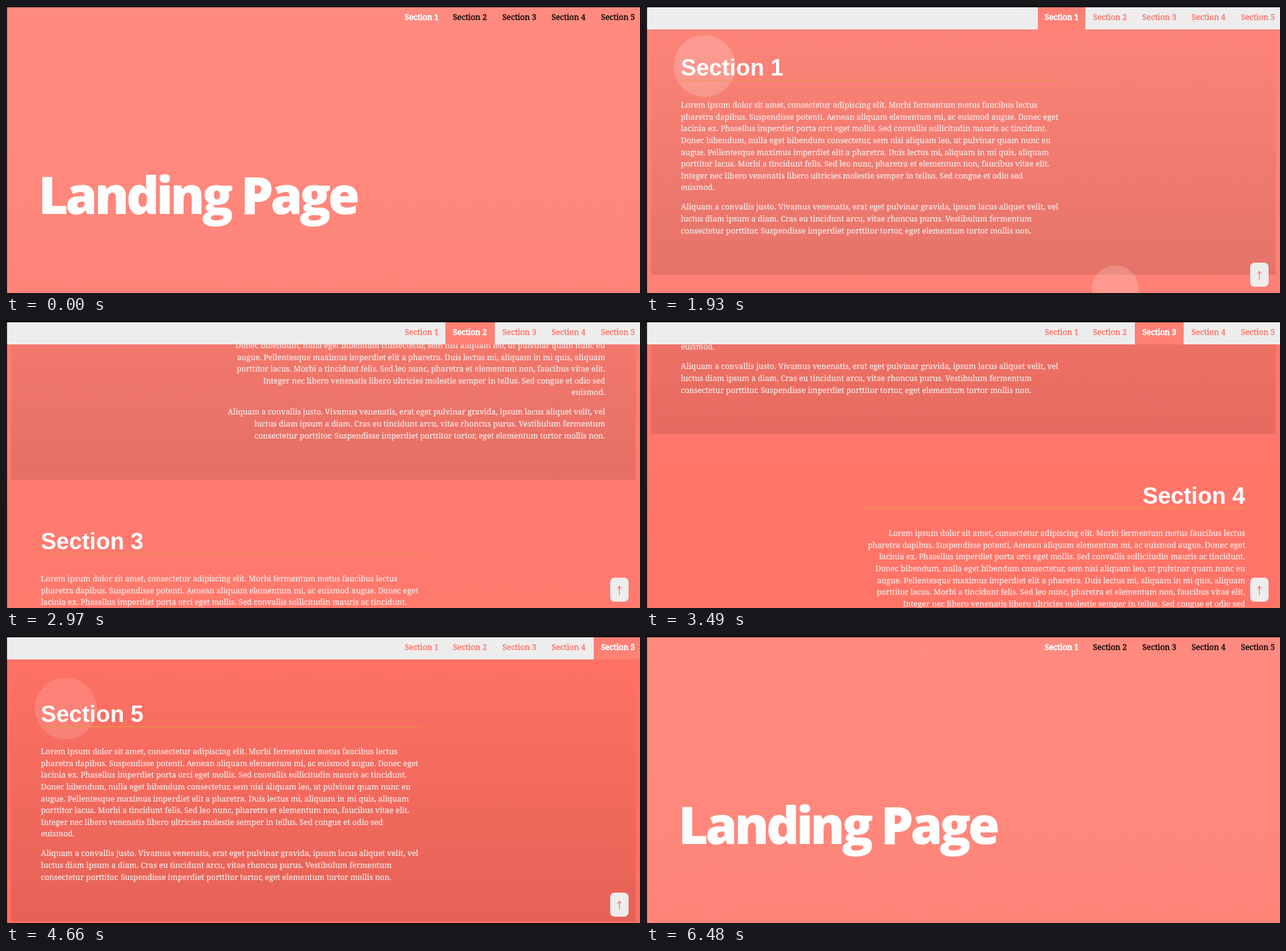
Animation, 1000 px wide and 454 px high, one loop 8 s. Source, as an HTML page with a canvas:

```html
<!DOCTYPE html>
<html lang="en">
<head>
<meta charset="utf-8">
<title>Landing Page</title>
<style>
  html, body { margin: 0; width: 100%; height: 100%; overflow: hidden; background: #ff897e; }
  canvas { display: block; width: 1000px; height: 454px; }
</style>
</head>
<body>
<canvas id="stage" width="1000" height="454"></canvas>
<script>
const ctx = document.getElementById('stage').getContext('2d');
const W = 1000, H = 454, LOOP = 8000, STEP = 130;
const HERO = 454, SECTION = 425, COUNT = 5;
const PAGE = HERO + SECTION * COUNT + 3;
const END = HERO + 1674;
const SERIF = '"Noto Serif", serif';
const PALE = '#eeeded', CORAL = '#ff8075';
const LINKS = [629, 705, 783, 860.5, 938.5];
const TABS = [618, 693, 771, 848, 927, 1000];

const PARAGRAPHS = [
  ['Lorem ipsum dolor sit amet, consectetur adipiscing elit. Morbi fermentum metus faucibus lectus',
   'pharetra dapibus. Suspendisse potenti. Aenean aliquam elementum mi, ac euismod augue. Donec eget',
   'lacinia ex. Phasellus imperdiet porta orci eget mollis. Sed convallis sollicitudin mauris ac tincidunt.',
   'Donec bibendum, nulla eget bibendum consectetur, sem nisi aliquam leo, ut pulvinar quam nunc eu',
   'augue. Pellentesque maximus imperdiet elit a pharetra. Duis lectus mi, aliquam in mi quis, aliquam',
   'porttitor lacus. Morbi a tincidunt felis. Sed leo nunc, pharetra et elementum non, faucibus vitae elit.',
   'Integer nec libero venenatis libero ultricies molestie semper in tellus. Sed congue et odio sed',
   'euismod.'],
  ['Aliquam a convallis justo. Vivamus venenatis, erat eget pulvinar gravida, ipsum lacus aliquet velit, vel',
   'luctus diam ipsum a diam. Cras eu tincidunt arcu, vitae rhoncus purus. Vestibulum fermentum',
   'consectetur porttitor. Suspendisse imperdiet porttitor tortor, eget elementum tortor mollis non.']
];

// Scroll path: time, position, speed in px per ms
const SCROLL = [
  [440, 0, 0], [980, HERO, 0], [1960, HERO, 0], [2970, HERO + 599, 0.8],
  [4010, HERO + 1579, 0.75], [4300, END, 0], [5830, END, 0], [6480, 0, 0]
];

function scrollAt(t) {
  if (t <= SCROLL[0][0]) return 0;
  for (let i = 1; i < SCROLL.length; i++) {
    const [t0, p0, v0] = SCROLL[i - 1], [t1, p1, v1] = SCROLL[i];
    if (t > t1) continue;
    const d = t1 - t0, u = (t - t0) / d, w = 1 - u;
    return w * w * (1 + 2 * u) * p0 + u * w * w * d * v0
         + u * u * (3 - 2 * u) * p1 - u * u * w * d * v1;
  }
  return 0;
}

// The picture advances in even steps, with three rests
function stepTime(t) {
  if (t < 500) return 0;
  if (t >= 6480) return 6480;
  if (t >= 4790 && t < 5830) return 4790;
  const start = t < 5830 ? 500 : 5830;
  return start + Math.floor((t - start) / STEP) * STEP;
}

// "bolder" thickens the strokes by that many pixels
function text(str, x, y, font, color, { align = 'left', bolder = 0, spacing = 0 } = {}) {
  ctx.font = font;
  ctx.letterSpacing = spacing + 'px';
  ctx.fillStyle = ctx.strokeStyle = color;
  ctx.textAlign = align;
  ctx.fillText(str, x, y);
  if (bolder) {
    ctx.lineWidth = bolder;
    ctx.lineJoin = 'round';
    ctx.strokeText(str, x, y);
  }
}

function rect(x, y, w, h, fill) {
  ctx.fillStyle = fill;
  ctx.fillRect(x, y, w, h);
}

function fade(y0, y1, from, to) {
  const g = ctx.createLinearGradient(0, y0, 0, y1);
  g.addColorStop(0, from);
  g.addColorStop(1, to);
  return g;
}

function orb(x, y, r, ms, period, alpha) {
  const a = Math.PI + ms / period * Math.PI * 2;
  ctx.fillStyle = `rgba(255,255,255,${0.187 * alpha})`;
  ctx.beginPath();
  ctx.arc(x + 11.7 * Math.cos(a), y + 11.7 * Math.sin(a), r, 0, Math.PI * 2);
  ctx.fill();
}

function orbs(index, top, t) {
  if (index === 0 && t < 4300) {
    const ms = Math.min(t, 1930) - 1930;
    orb(104, top + 95, 48.7, ms, 4000, 1);
    orb(752, top + 447.5, 37, ms, -5000, 1);
  } else if (index === 4 && t > 4300) {
    const ms = t < 5830 ? t - 4300 : 0;
    orb(104, top + 95, 48.7, ms, 4000, t < 5830 ? Math.min(1, ms / 500) : 1);
  }
}

function section(index, top) {
  const right = index % 2 === 1;
  const left = right ? 345 : 55;
  const x = right ? 945 : 55;
  const align = right ? 'right' : 'left';
  text('Section ' + (index + 1), x, top + 109.5,
    'bold 36.4px "Liberation Sans", Arial, sans-serif', '#fff', { align });
  rect(left, top + 117, 600, 1, '#e2a03a');
  PARAGRAPHS.forEach((lines, p) => lines.forEach((line, i) =>
    text(line, x, top + 161 + p * 161.3 + i * 18.64, '12.28px ' + SERIF, '#f8ebe8',
      { align, bolder: 0.2 })));
}

function nav(active, scrolled) {
  if (scrolled) {
    rect(0, 0, W, 37, PALE);
    rect(TABS[active], 2, TABS[active + 1] - TABS[active], 35, CORAL);
  }
  LINKS.forEach((x, i) => {
    const on = i === active;
    const color = on ? '#fff' : scrolled ? '#fa786d' : '#140a09';
    text('Section ' + (i + 1), x, 22, '500 12.5px ' + SERIF, color, { bolder: on ? 0.8 : 0.45 });
  });
}

function topButton() {
  ctx.fillStyle = PALE;
  ctx.beginPath();
  ctx.roundRect(953, 406, 29, 38, 7);
  ctx.fill();
  ctx.strokeStyle = '#f4685c';
  ctx.lineWidth = 1.1;
  ctx.beginPath();
  ctx.moveTo(967.5, 433);
  ctx.lineTo(967.5, 419.5);
  ctx.moveTo(964.5, 423.5);
  ctx.lineTo(967.5, 419.5);
  ctx.lineTo(970.5, 423.5);
  ctx.stroke();
}

function draw(now) {
  const t = stepTime(now % LOOP);
  const y = Math.round(scrollAt(t));
  const topOf = i => HERO + i * SECTION - y;
  let active = 0;
  for (let i = 1; i < COUNT; i++) if (topOf(i) < 100) active = i;

  rect(0, 0, W, H, fade(-y, PAGE - y, '#ff8a7f', '#ff6d60'));
  text('Landing Page', 51, 329 - y, '800 81px "Open Sans", sans-serif', '#fff', { spacing: -4.4 });

  const top = topOf(active);
  rect(8, top, 985, SECTION, fade(top, top + SECTION, 'rgba(0,0,0,0)', 'rgba(0,0,0,.1)'));
  orbs(active, top, t);
  for (let i = 0; i < COUNT; i++) {
    const sy = topOf(i);
    if (sy < H && sy + SECTION > 0) section(i, sy);
  }

  const scrolled = y > 60;
  nav(active, scrolled);
  if (scrolled) topButton();
  rect(0, 0, W, 2, '#000');
  rect(0, 0, 1.5, H, '#000');
}

const began = performance.now();
function tick() {
  draw(performance.now() - began);
  requestAnimationFrame(tick);
}
tick();
</script>
</body>
</html>
```
